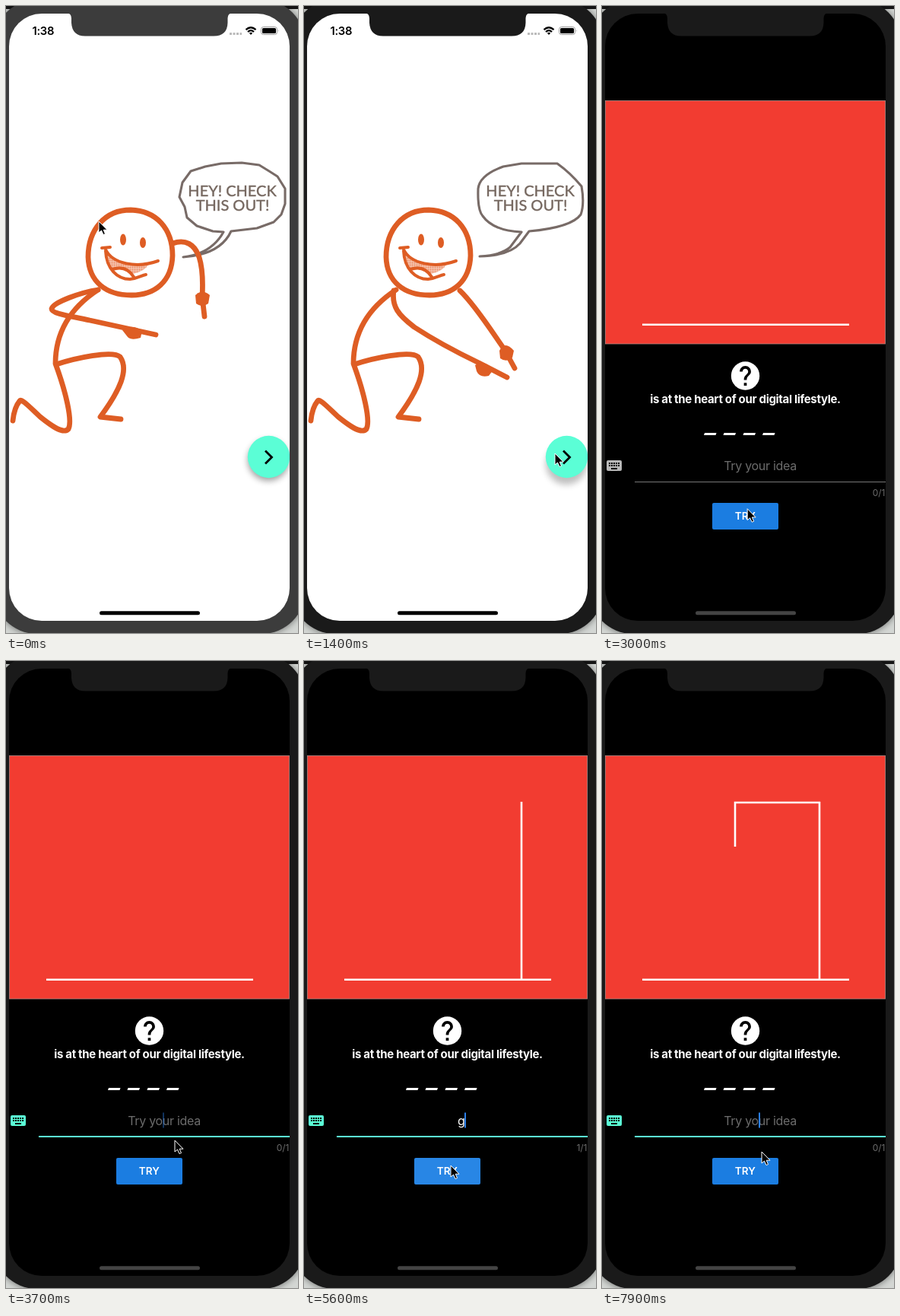
Write an HTML page that moves like this. It is 384x824 px and loops after 8000 ms.

```html
<!DOCTYPE html>
<html lang="en">
<head>
<meta charset="utf-8">
<title>Phone word game</title>
<style>
  html, body { margin: 0; width: 100%; height: 100%; overflow: hidden; background: #d3d6d3; }
  svg { display: block; width: 100%; height: 100%; }
  text { font-family: Inter, "Liberation Sans", sans-serif; }
  .ink { fill: none; stroke: #de5d24; stroke-width: 6.8; stroke-linecap: round; stroke-linejoin: round; }
  .blob { fill: #de5d24; stroke: none; }
  .bubble { fill: #fff; stroke: #786b67; stroke-width: 3.1; stroke-linejoin: round; }
  .speech { font: 20px Lato, sans-serif; fill: #75675f; stroke: #75675f; stroke-width: .4; text-anchor: middle; }
  .chalk { fill: none; stroke: #fff; stroke-width: 2.6; }
  .mid { text-anchor: middle; }
</style>
</head>
<body>
<svg viewBox="0 0 384 824" preserveAspectRatio="none">
  <defs>
    <clipPath id="glass"><rect x="4" y="10" width="369" height="798" rx="43"/></clipPath>
    <filter id="blur" x="-50%" y="-50%" width="200%" height="200%"><feGaussianBlur stdDeviation="4"/></filter>
    <pattern id="dots" width="3" height="3" patternUnits="userSpaceOnUse">
      <rect width="3" height="3" fill="#f6c3ae"/><circle cx="1.5" cy="1.5" r="1" fill="#ec8d68"/>
    </pattern>
  </defs>

  <rect width="384" height="824" fill="#d3d6d3"/>
  <rect width="384" height="4" fill="#151515"/>
  <rect x="-16" y="-8" width="409" height="834" rx="56" fill="#000" opacity=".45" filter="url(#blur)"/>
  <rect class="shell" x="-16" y="-8" width="409" height="833" rx="56"/>

  <g clip-path="url(#glass)">
    <g id="intro">
      <rect width="384" height="824" fill="#fff"/>
      <text x="34.500" y="38" font-size="14.800" font-weight="600" letter-spacing="-.3">1:38</text>
      <path d="M294 36.500H310" stroke="#bbb" stroke-width="3" stroke-dasharray="3 1.500"/>
      <path d="M315.500 31.200Q322 25.200 328.500 31.200M318 34Q322 30.200 326 34" fill="none" stroke="#000" stroke-width="2.300"/>
      <path d="M319.800 35.600Q322 33.700 324.200 35.600L322 38z"/>
      <rect x="335.500" y="27.500" width="21" height="10" rx="3" fill="none" stroke="#999"/>
      <rect x="337" y="29" width="18" height="7" rx="1.600"/>
      <path d="M358 31v3q1.500 -1.500 0 -3" fill="#999"/>

      <g id="poseA">
        <path class="bubble" d="M286 297L272 296L251 289L238 278L235 264L228 251L232 232L243 217L262 211L283 207L310 206L333 209L346 217L357 224L367 240L367 260L362 274L352 284L330 292L296 296C290 309 276 327 233 330C258 327 275 317 286 297z"/>
        <g class="ink">
          <path d="M121 373C100 376 62 389 60 398C60 405 90 408 110 413L197 432"/>
          <path d="M219 312C236 306 248 313 254 330C259 346 259 365 258 382L261 408"/>
          <path class="blob" d="M153 426Q166 417 179 427L177 436Q165 440 160 435z"/>
          <path class="blob" d="M249 380Q258 371 268 380L266 391Q258 397 250 391z"/>
        </g>
      </g>
      <g id="poseB">
        <path class="bubble" d="M286 297C262 296 245 290 235 276Q228 268 229 240Q231 222 262 211L286 207H333Q350 219 365 237Q369 260 364 274Q352 291 296 296L284 312Q270 328 231 329Q258 328 271 317z"/>
        <g class="ink">
          <path d="M118 374C115 395 124 406 145 422C174 441 205 457 230 469L267 488"/>
          <path d="M205 374C226 394 249 431 264 452L277 476"/>
          <path class="blob" d="M225 472Q237 464 249 478L243 486Q231 489 227 480z"/>
          <path class="blob" d="M257 453Q264 439 276 453L274 462Q266 469 258 463z"/>
        </g>
      </g>
      <text class="speech" x="297.500" y="250">HEY! CHECK</text>
      <text class="speech" x="298" y="269">THIS OUT!</text>
      <g class="ink">
        <path d="M164 268C198 269 219 293 219 328C218 362 196 380 165 380C131 380 109 362 108 330C108 294 130 268 164 268z"/>
        <path d="M121 373C95 390 65 420 65 470C78 505 88 545 82 556C75 563 60 552 45 540C32 528 20 515 18 519C13 525 10 535 9 545"/>
        <path d="M66 471C90 463 140 452 150 461C162 478 150 505 124 540L151 543"/>
        <path d="M131 321C140 338 164 344 188 339Q182 349 167 352Q154 341 138 345z" fill="url(#dots)" stroke="none"/>
        <path d="M126 318L137 317M131 320C140 339 172 345 200 335M131 322C132 345 146 359 163 359C174 358 178 354 184 353M140 346Q158 340 168 356" stroke-width="4"/>
        <ellipse class="blob" cx="154" cy="307" rx="4" ry="7.500"/>
        <ellipse class="blob" cx="180" cy="311" rx="4" ry="7"/>
      </g>
      <circle id="fabShade" cx="345" r="27" filter="url(#blur)"/>
      <circle cx="345.500" cy="592.500" r="27.700" fill="#5bfed6"/>
      <path d="M341 584.500L349.500 593L341 601.500" fill="none" stroke="#000" stroke-width="2.800"/>
    </g>

    <g id="game">
      <rect width="384" height="824"/>
      <g id="board">
        <rect x="4.500" y="124.500" width="368" height="319.500" fill="#f23c31" stroke="#b08a86" stroke-width=".8"/>
        <path class="chalk" d="M53 418.700H325"/>
        <path id="post" class="chalk" d="M286 418V185"/>
        <path id="beam" class="chalk" d="M287 186H175V244"/>
      </g>
      <g id="panel">
        <circle cx="188.500" cy="486" r="18.700" fill="#fff"/>
        <path transform="translate(166.300 463.800) scale(1.850)" d="M13 19h-2v-2h2v2zm2.070-7.750l-.9.920C13.450 12.900 13 13.500 13 15h-2v-.5c0-1.100.450-2.100 1.170-2.830l1.240-1.260c.370-.360.590-.860.590-1.410 0-1.100-.9-2-2-2s-2 .9-2 2H8c0-2.210 1.790-4 4-4s4 1.790 4 4c0 .880-.360 1.680-.930 2.250z"/>
        <text class="mid" x="188.500" y="522" font-size="15" font-weight="700" letter-spacing="-.32" fill="#fff">is at the heart of our digital lifestyle.</text>
        <g id="blanks" fill="#fff"></g>
        <g id="keys">
          <rect x="6" y="597" width="20" height="14" rx="2"/>
          <path d="M9 601H23M9 604H23" stroke="#000" stroke-width="2" stroke-dasharray="2 1"/>
          <path d="M12 608H20" stroke="#000" stroke-width="2"/>
        </g>
        <text id="hint" class="mid" x="208" y="610" font-size="16" letter-spacing="-.3" fill="#6c6c6c">Try your idea</text>
        <text id="typed" class="mid" x="207" y="610" font-size="16" fill="#fff"></text>
        <rect id="caret" y="593.500" width="2" height="20" fill="#2b7fe8"/>
        <rect id="rule" x="43" width="330"/>
        <text id="count" x="372.500" y="644" font-size="12" text-anchor="end" fill="#6c6c6c"></text>
        <rect id="button" x="145" y="653" width="87" height="35" rx="2"/>
        <text class="mid" x="188.300" y="675" font-size="13.500" font-weight="600" fill="#fff">TRY</text>
      </g>
    </g>
    <rect id="home" x="123" y="795.300" width="132" height="5" rx="2.500"/>
  </g>
  <path class="shell" d="M80 9Q86 10 86 16V22Q87 39.500 104 39.500H273Q291 39.500 291.500 22V16Q291.500 10 297.500 9z"/>
  <path id="mouse" d="M0 0V15L3.500 12L6 17.500L8.500 16.500L6.200 11.200H11z" stroke="#fff"/>
</svg>
<script>
const LOOP = 8000;
const el = id => document.getElementById(id);
const set = (node, attrs) => { for (const k in attrs) node.setAttribute(k, attrs[k]); };
const show = (id, on) => { el(id).style.display = on ? '' : 'none'; };
const within = (t, a, b) => t >= a && t < b;
const clamp = x => Math.min(1, Math.max(0, x));
const shells = document.querySelectorAll('.shell');

// Pointer stops: time, x, y
const stops = [
  [0, 122, 283], [300, 122, 283], [1100, 330, 588], [1400, 330, 588], [1600, 329, 587],
  [1800, 300, 468], [2050, 255, 590], [2300, 190, 666], [2950, 190, 666], [3250, 205, 597],
  [3450, 207, 590], [3700, 222, 630], [4000, 192, 671], [4700, 192, 671], [4900, 203, 600],
  [5100, 215, 512], [5450, 193, 663], [5650, 193, 663], [5900, 194, 667], [6500, 194, 667],
  [6700, 160, 655], [6900, 210, 645], [LOOP, 210, 645]
];

el('blanks').innerHTML = [134, 159.5, 185.5, 211]
  .map(x => `<path d="M${x} 564l1 -3h15.500l-1 3z"/>`).join('');

function pointer(t) {
  const i = Math.max(1, stops.findIndex(s => s[0] > t));
  const [t0, x0, y0] = stops[i - 1], [t1, x1, y1] = stops[i];
  const u = (t - t0) / (t1 - t0), e = u * u * (3 - 2 * u);
  return [x0 + (x1 - x0) * e, y0 + (y1 - y0) * e];
}

function caretAlpha(t) {
  if (t < 3300) return 0;
  if (within(t, 4100, 6600)) return 1;
  const p = t % 1000;
  if (p < 600) return 1 - clamp((p - 100) / 250);
  return clamp((p - 600) / 250);
}

function draw(t) {
  const game = t >= 1500;
  const focused = t >= 3300;
  const loading = within(t, 6200, 6400);
  const letter = within(t, 4100, 4500) ? 'e' : within(t, 5200, 6200) ? 'g' : '';
  const second = Math.floor(t / 200) % 2 === 1;
  const pressed = t >= 1300;

  shells.forEach(s => set(s, { fill: t < 200 ? '#3c3c3c' : '#1a1a1a' }));
  show('intro', !game);
  show('game', game);
  show('poseA', !second);
  show('poseB', second);
  set(el('fabShade'), { cy: pressed ? 602 : 597, opacity: pressed ? .25 : .38 });

  show('board', !loading);
  show('post', t >= 4500);
  show('beam', t >= 6400);
  set(el('panel'), { transform: `translate(0 ${loading ? -160 : 0})` });

  const teal = '#5bfed6';
  set(el('keys'), { fill: focused ? teal : '#b8b8b8' });
  set(el('rule'), focused ? { y: 624, height: 2, fill: teal } : { y: 625, height: 1, fill: '#777' });
  el('typed').textContent = letter;
  el('count').textContent = (letter ? 1 : 0) + '/1';
  set(el('hint'), { opacity: letter || loading ? 0 : 1 });
  set(el('caret'), { x: letter ? 211 : 206, opacity: caretAlpha(t) });
  const lit = within(t, 4350, 4600) || within(t, 5500, 6400);
  set(el('button'), { fill: lit ? '#2886e5' : '#1b7de1' });
  set(el('home'), { fill: game ? '#444' : '#000' });
  set(el('mouse'), { transform: `translate(${pointer(t)})` });
}

const start = performance.now();
function tick() {
  draw((performance.now() - start) % LOOP);
  requestAnimationFrame(tick);
}
draw(0);
requestAnimationFrame(tick);
</script>
</body>
</html>
```
